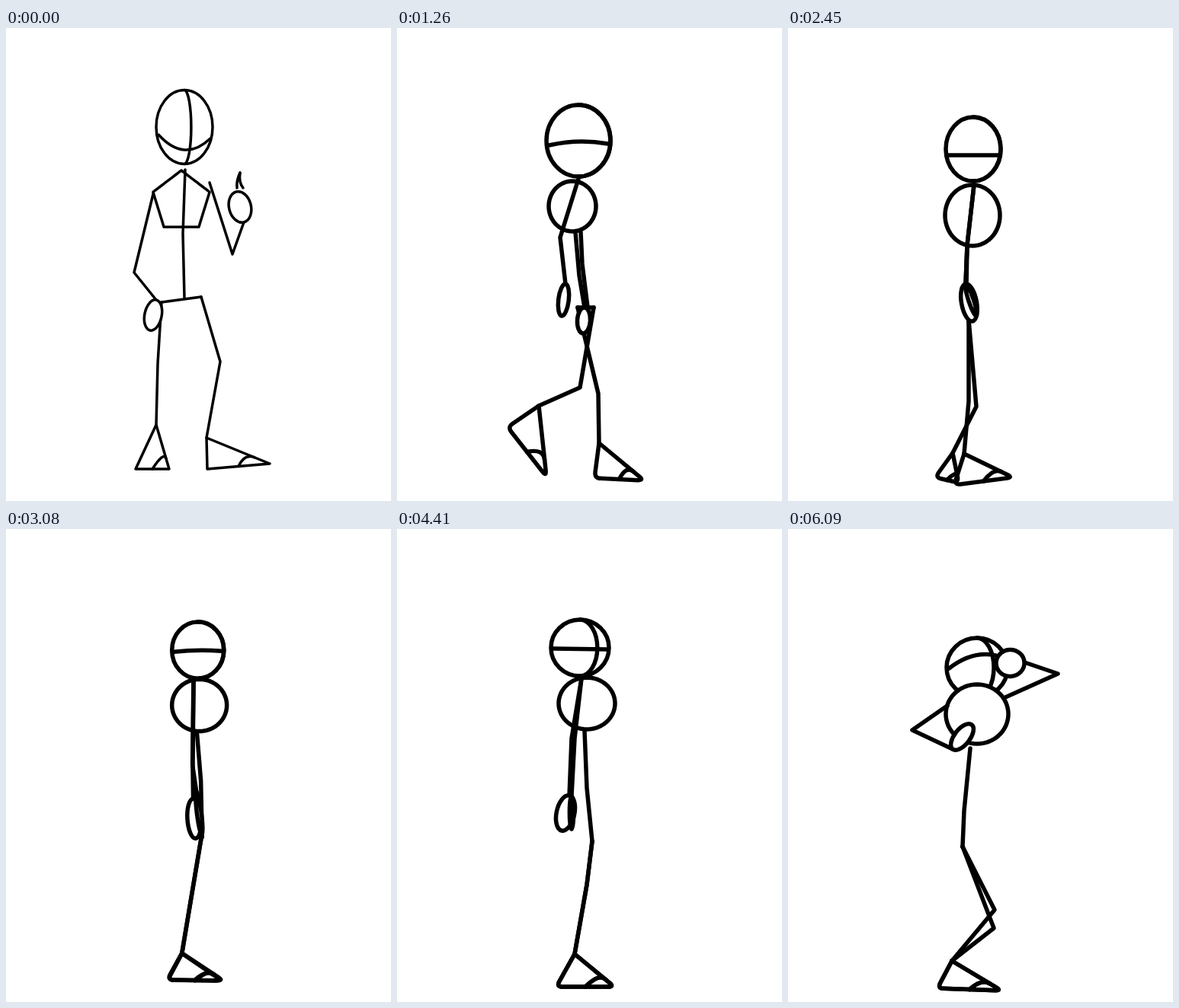
An HTML page with a canvas that plays this animation: 505x621 px, repeating every 6160 ms.

```html
<!DOCTYPE html>
<html lang="en">
<head>
<meta charset="utf-8">
<title>Stick figure walk</title>
<style>
html, body { margin: 0; width: 100%; height: 100%; overflow: hidden; background: #fff; }
canvas { display: block; }
</style>
</head>
<body>
<canvas id="stage" width="505" height="621"></canvas>
<script>
const ctx = document.getElementById('stage').getContext('2d');
const LOOP = 6160, STEP = 70, TAU = Math.PI * 2;

// head, chest: centre and radii    brow: left, right, bend    turn: 0 facing us, 1 profile
// arm: shoulder, elbow, wrist, fingertip    fat: hand width / length
// leg: hip, knee, ankle, heel, toe    round: 0 angular, 1 round    at: offset of the whole figure
// A missing B limb lies on its A twin.
const pose = p => ({
  at: [0, 0], width: 5.5, round: 1, thumb: 0, turn: 1,
  armB: p.armA, legB: p.legA, fatB: p.fatA, ...p
});

const thumbsUp = pose({
  width: 3.5, round: 0, thumb: 1, turn: 0.24,
  head: [234, 130, 37, 48.5], brow: [10, 15, 35], chest: [230, 228, 39, 41],
  spine: [[235, 186], [232, 270], [234, 354]],
  armA: [[267, 203], [297, 297], [312, 255], [302, 215]], fatA: 0.7,
  armB: [[193, 218], [168, 321], [197, 357], [189, 397]], fatB: 0.55,
  legA: [[256, 353], [281, 438], [263, 538], [264, 579], [346, 572]],
  legB: [[204, 360], [199, 441], [197, 521], [170, 579], [214, 579]]
});

const passing = pose({
  head: [238, 148, 42, 47], brow: [6, 4, -8], chest: [230, 234, 31, 33],
  spine: [[241, 268], [243, 310], [250, 366]],
  armA: [[238, 198], [214, 275], [221, 336], [216, 378]], fatA: 0.32,
  armB: [[234, 268], [239, 325], [246, 367], [244, 401]], fatB: 0.5,
  legA: [[237, 367], [264, 480], [265, 545], [259, 591], [324, 594]],
  legB: [[258, 367], [240, 472], [186, 496], [145, 524], [196, 589]]
});

// Widest point of a step, limb B leading.
const stride = pose({
  ...passing,
  armA: [[238, 198], [280, 295], [325, 320], [348, 328]],
  armB: [[232, 204], [185, 297], [150, 335], [137, 360]],
  legA: [[246, 370], [195, 470], [108, 545], [74, 553], [126, 602]],
  legB: [[246, 370], [297, 480], [317, 546], [310, 596], [380, 574]]
});

const feetMeet = pose({
  head: [243, 159, 36, 42], brow: [8, 8, 0], chest: [242, 246, 36, 40],
  spine: [[235, 285], [234, 340], [237, 385]],
  armA: [[244, 206], [235, 285], [233, 336], [242, 385]], fatA: 0.4,
  armB: [[244, 206], [235, 285], [233, 336], [247, 378]], fatB: 0.15,
  legA: [[237, 383], [237, 490], [231, 559], [218, 600], [295, 590]],
  legB: [[237, 383], [247, 497], [216, 558], [193, 590], [224, 597]]
});

const standing = pose({
  head: [252, 159, 34, 37], brow: [2, 1, -3], chest: [254, 231, 36, 34],
  spine: [[251, 268], [256, 330], [258, 405]],
  armA: [[246, 200], [245, 310], [246, 355], [249, 407]], fatA: 0.35,
  armB: [[246, 200], [245, 310], [250, 345], [257, 403]], fatB: 0.1,
  legA: [[257, 405], [242, 490], [231, 557], [212, 592], [285, 593]]
});

const armsBack = pose({
  head: [240, 156, 38, 37], brow: [1, 2, 0], turn: 0.6, chest: [249, 229, 37, 34],
  spine: [[246, 265], [249, 340], [256, 410]],
  armA: [[242, 196], [229, 275], [226, 350], [216, 396]], fatA: 0.5,
  armB: [[242, 196], [233, 275], [229, 350], [229, 394]], fatB: 0.12,
  legA: [[256, 410], [249, 467], [233, 558], [209, 601], [285, 601]]
});

const handUp = pose({
  head: [248, 183, 40, 39], brow: [1, -11, -24], turn: 0.55, chest: [250, 240, 41, 42],
  spine: [[239, 296], [232, 370], [232, 415]],
  armA: [[291, 218], [353, 202], [311, 168], [273, 169]], fatA: 0.95,
  armB: [[207, 237], [160, 285], [218, 291], [255, 264]], fatB: 0.5,
  legA: [[232, 415], [272, 480], [204, 598], [200, 603], [280, 606]],
  legB: [[232, 415], [257, 532], [217, 567], [196, 603], [280, 606]]
});

const kneesBent = pose({
  ...handUp,
  head: [248, 182, 40, 39], brow: [1, -12, -22], chest: [248, 243, 41, 39],
  spine: [[239, 288], [231, 370], [229, 417]],
  armA: [[285, 221], [354, 190], [310, 175], [273, 177]],
  armB: [[209, 232], [163, 264], [216, 289], [241, 257]],
  legA: [[229, 417], [271, 500], [215, 567], [196, 603], [280, 606]],
  legB: [[229, 417], [270, 524], [215, 567], [196, 603], [280, 606]]
});

const shift = (p, ...at) => ({ ...p, at });
const swap = p => ({
  ...p, armA: p.armB, armB: p.armA, legA: p.legB, legB: p.legA, fatA: p.fatB, fatB: p.fatA
});

const KEYS = [
  [0, thumbsUp], [280, thumbsUp],
  [630, shift(passing, 5, -10)], [910, stride],
  [1260, swap(passing)], [1610, swap(shift(stride, 28, 5))],
  [1890, shift(passing, 5, 6)], [2170, shift(stride, 22, 5)],
  [2450, feetMeet], [3150, standing], [3640, standing], [4410, armsBack],
  [4970, shift(handUp, 2, 1)], [5390, handUp], [5740, kneesBent], [6090, kneesBent],
  [LOOP, kneesBent]
];

// Blends numbers, arrays and objects of the same form.
function mix(a, b, u) {
  if (typeof a === 'number') return a + (b - a) * u;
  if (Array.isArray(a)) return a.map((v, i) => mix(v, b[i], u));
  return Object.fromEntries(Object.keys(a).map(k => [k, mix(a[k], b[k], u)]));
}

// Repeatable noise in -1..1 for the hand-drawn wobble.
const noise = n => {
  const s = Math.sin(n * 12.9898) * 43758.5453;
  return (s - Math.floor(s)) * 2 - 1;
};
let seed, wobble;
const shake = v => v + wobble * noise(seed++);

function line(pts) {
  ctx.beginPath();
  for (const p of pts) ctx.lineTo(...p.map(shake));
  ctx.stroke();
}

function curve(from, bend, to) {
  ctx.beginPath();
  ctx.moveTo(...from);
  ctx.quadraticCurveTo(...bend, ...to);
  ctx.stroke();
}

function oval(x, y, rx, ry, angle = 0) {
  ctx.beginPath();
  ctx.ellipse(shake(x), shake(y), rx, ry, angle, 0, TAU);
  ctx.fill();
  ctx.stroke();
}

function drawHead({ head: [x, y, rx, ry], brow: [left, right, bend], turn }) {
  oval(x, y, rx, ry);
  const reach = rx * 0.92;
  curve([x - reach, y + left], [x, y + (left + right) / 2 + bend], [x + reach, y + right]);
  ctx.beginPath();
  ctx.ellipse(x, y, rx * turn, ry, 0, -TAU / 4, TAU / 4);
  ctx.stroke();
}

// A pentagon that swells into an oval.
function drawChest([x, y, rx, ry], round) {
  const side = TAU / 5;
  ctx.beginPath();
  for (let i = 0; i < 60; i++) {
    const a = i / 60 * TAU;
    const r = mix(Math.cos(side / 2) / Math.cos(a % side - side / 2), 1, round);
    ctx.lineTo(x + Math.sin(a) * r * rx, y - Math.cos(a) * r * ry);
  }
  ctx.closePath();
  ctx.fill();
  ctx.stroke();
}

function drawLeg([hip, knee, ankle, heel, toe], round) {
  line([hip, knee, ankle]);
  const near = (p, q) => mix(p, q, Math.min(0.5, 8 * round / Math.hypot(q[0] - p[0], q[1] - p[1])));
  ctx.beginPath();
  ctx.moveTo(...ankle);
  ctx.lineTo(...near(heel, ankle));
  ctx.quadraticCurveTo(...heel, ...near(heel, toe));
  ctx.lineTo(...near(toe, heel));
  ctx.quadraticCurveTo(...toe, ...near(toe, ankle));
  ctx.closePath();
  ctx.stroke();
  curve(mix(heel, toe, 0.5), mix(ankle, toe, 0.6), mix(ankle, toe, 0.76));
}

function drawHand([, , wrist, tip], fat) {
  const dx = tip[0] - wrist[0], dy = tip[1] - wrist[1], half = Math.hypot(dx, dy) / 2;
  oval(...mix(wrist, tip, 0.5), half, half * fat, Math.atan2(dy, dx));
}

function drawFigure(p) {
  drawHead(p);
  line([p.legA[0], p.legB[0]]);
  drawLeg(p.legB, p.round);
  drawLeg(p.legA, p.round);
  drawChest(p.chest, p.round);
  line(p.spine);
  line(p.armB.slice(0, 3));
  line(p.armA.slice(0, 3));
  drawHand(p.armA, p.fatA);
  drawHand(p.armB, p.fatB);
  if (p.thumb > 0) {
    const [x, y] = p.armA[3], h = 25 * p.thumb;
    curve([x + 1, y - h * 0.2], [x, y - h * 0.6], [x + 5, y - h]);
    curve([x + 5, y - h], [x + 3, y - h * 0.5], [x + 9, y - h * 0.2]);
  }
}

function draw(time) {
  const frame = Math.floor(time % LOOP / STEP), t = frame * STEP;
  const i = KEYS.findIndex(k => k[0] > t);
  const [t0, from] = KEYS[i - 1], [t1, to] = KEYS[i];
  let u = (t - t0) / (t1 - t0);
  seed = frame * 331;
  wobble = 0.9 * Math.sin(Math.PI * u);
  const walking = t >= 630 && t < 2450;
  if (!walking) u = u * u * (3 - 2 * u);
  const p = mix(from, to, u);

  ctx.setTransform(1, 0, 0, 1, 0, 0);
  ctx.fillStyle = '#fff';
  ctx.fillRect(0, 0, 505, 621);
  ctx.translate(...p.at);
  ctx.strokeStyle = '#000';
  ctx.lineCap = ctx.lineJoin = 'round';
  ctx.lineWidth = p.width;
  drawFigure(p);
}

const start = performance.now();
function tick() {
  draw(performance.now() - start);
  requestAnimationFrame(tick);
}
tick();
</script>
</body>
</html>
```
